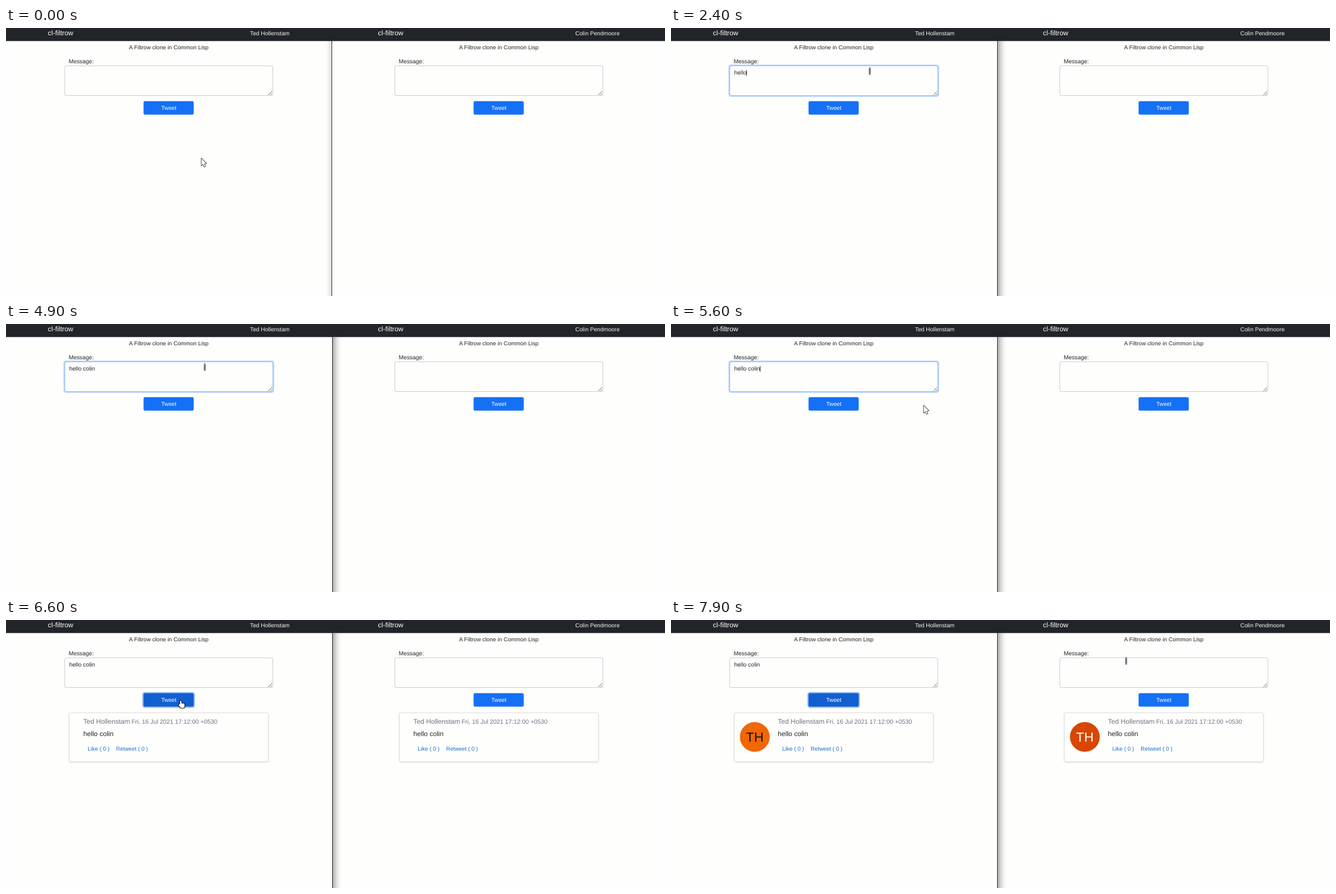
An HTML page with a canvas that plays this animation: 1172x478 px, repeating every 8000 ms.

```html
<!DOCTYPE html>
<html lang="en">
<head>
<meta charset="utf-8">
<title>cl-filtrow</title>
<style>
html, body { margin: 0; width: 1172px; height: 478px; overflow: hidden; background: #fefefd; }
canvas { display: block; }
</style>
</head>
<body>
<canvas id="stage" width="1172" height="478"></canvas>
<script>
const ctx = document.getElementById('stage').getContext('2d');
const LOOP = 8000, STEP = 100, W = 1172, H = 478, COL = 587, HEADER = 23.3;
const INK = '#212529', PAGE = '#fefefd', GREY = '#6c757d', LINK = '#1a6ed0';
const AUTHOR = 'Ted Hollenstam', READER = 'Colin Pendmoore';
const MESSAGE = 'hello colin';
const FOCUS = 900, HOVER = 6300, CLICK = 6400, POSTED = 6600, BLINK = 550;

const FIELD = { x: 104.5, y: 67.5, w: 370, h: 53 };
const BUTTON = { x: 244.6, y: 130.6, w: 89.2, h: 24 };

// first word, a pause, the space, then the second word
const SPACE = MESSAGE.indexOf(' ');
const KEYS = [...MESSAGE].map((c, i) =>
  i < SPACE ? 2000 + STEP * i
  : i === SPACE ? 3400
  : 3700 + STEP * Math.floor((i - SPACE - 1) * 1.5));

const HOME = { x: 347, y: 232 };
const MOVES = [
  { from: 400, until: 700, x: 353, y: 77, bow: 15 },
  { from: 5200, until: 5700, x: 460, y: 153, bow: 0 },
  { from: 6000, until: 6300, x: 311, y: 145, bow: 0 },
  { from: 7200, until: 7900, x: 809, y: 73, bow: 6 }
];

const ease = k => k * k * (3 - 2 * k);

function pointerAt(t) {
  let at = HOME;
  for (const m of MOVES) {
    if (t >= m.until) { at = m; continue; }
    if (t <= m.from) break;
    const k = ease((t - m.from) / (m.until - m.from));
    const dx = m.x - at.x, dy = m.y - at.y;
    const side = m.bow * Math.sin(Math.PI * k) / Math.hypot(dx, dy);
    return { x: at.x + dx * k - dy * side, y: at.y + dy * k + dx * side };
  }
  return at;
}

function text(str, x, y, size, color = INK, align = 'left') {
  ctx.font = `${size}px "Liberation Sans", Arial, sans-serif`;
  ctx.textAlign = align;
  ctx.fillStyle = color;
  ctx.fillText(str, x, y);
}

function box({ x, y, w, h }, grow, fill, stroke) {
  ctx.beginPath();
  ctx.roundRect(x - grow, y - grow, w + 2 * grow, h + 2 * grow, 2.5 + grow);
  if (fill) { ctx.fillStyle = fill; ctx.fill(); }
  if (stroke) { ctx.strokeStyle = stroke; ctx.lineWidth = 1; ctx.stroke(); }
}

function field(focus) {
  if (focus) box(FIELD, 2.5, `rgba(13,110,253,${0.25 * focus})`);
  box(FIELD, 0, PAGE, '#c9cccd');
  if (focus) box(FIELD, 0, null, `rgba(134,183,254,${focus})`);
  ctx.strokeStyle = '#666';
  ctx.beginPath();
  for (const size of [6.5, 2.5]) {
    ctx.moveTo(473 - size, 119.5);
    ctx.lineTo(473, 119.5 - size);
  }
  ctx.stroke();
}

function button(dark, ring) {
  if (ring) box(BUTTON, 2.2, 'rgba(49,132,253,.5)');
  box(BUTTON, 0, dark ? '#125fd0' : '#1470f5');
  text('Tweet', 289.5, 146, 10.2, '#fff', 'center');
}

function card(avatar, fill, ink) {
  const frame = { x: 112.5, y: 165.5, w: 354, h: 87 };
  ctx.save();
  ctx.shadowColor = 'rgba(0,0,0,.12)';
  ctx.shadowOffsetY = 1.3;
  ctx.shadowBlur = 3;
  box(frame, 0.5, PAGE);
  ctx.restore();
  box(frame, 0, null, '#dcdddd');
  ctx.save();
  if (avatar) {
    ctx.fillStyle = fill;
    ctx.beginPath();
    ctx.arc(149, 208.5, 26.5, 0, Math.PI * 2);
    ctx.fill();
    text('TH', 149, 217.3, 23.5, ink, 'center');
  } else ctx.translate(-52.5, 0);
  text(AUTHOR, 190, 185.3, 12.05, GREY);
  text('Fri, 16 Jul 2021 17:12:00 +0530', 275.7, 185.3, 10.8, GREY);
  text(MESSAGE, 190, 206.5, 12.1);
  text('Like ( 0 )', 197.8, 233, 10, LINK);
  text('Retweet ( 0 )', 248.3, 233, 9.9, LINK);
  ctx.restore();
}

function panel(dx, user, body) {
  ctx.save();
  ctx.translate(dx, 0);
  text('cl-filtrow', 74.6, 13, 12.3, '#fff');
  text(user, 504.3, 13, 10.2, '#f4f4f4', 'right');
  text('A Filtrow clone in Common Lisp', 289.5, 38, 10.1, INK, 'center');
  text('Message:', 111.4, 62.7, 10.3);
  body();
  ctx.restore();
}

// the active window casts its shadow over the other one
function divider(x, dir, reach, peak) {
  for (let i = 1; i <= reach; i++) {
    ctx.fillStyle = `rgba(0,0,0,${peak * (1 - i / (reach + 1)) ** 2})`;
    ctx.fillRect(x + dir * i, HEADER, 1, H);
  }
  ctx.fillStyle = '#26292b';
  ctx.fillRect(x, 0, 1, H);
}

function outline(width) {
  ctx.lineJoin = 'round';
  ctx.lineWidth = width;
  ctx.strokeStyle = '#000';
  ctx.fillStyle = '#fff';
  ctx.stroke();
  ctx.fill();
}

function arrow() {
  ctx.beginPath();
  ctx.moveTo(0.5, 0.5);
  ctx.lineTo(0.5, 13.5);
  ctx.lineTo(3.4, 10.8);
  ctx.lineTo(5.4, 15.6);
  ctx.lineTo(7.5, 14.7);
  ctx.lineTo(5.5, 10);
  ctx.lineTo(9.3, 9.6);
  ctx.closePath();
  outline(1.4);
}

function beam() {
  ctx.beginPath();
  for (const y of [-5, 5]) {
    ctx.moveTo(-1.5, y);
    ctx.lineTo(1.5, y);
  }
  ctx.moveTo(0, -5);
  ctx.lineTo(0, 5);
  for (const [color, width] of [['#000', 2.6], ['#fff', 0.8]]) {
    ctx.strokeStyle = color;
    ctx.lineWidth = width;
    ctx.stroke();
  }
}

function hand() {
  ctx.beginPath();
  ctx.roundRect(-1.5, -1, 2.6, 9, 1.2);
  ctx.roundRect(-3.5, 5, 3, 4, 1.2);
  ctx.roundRect(-1.5, 3.8, 8, 8, 2);
  outline(2);
}

function pointer(t) {
  const { x, y } = pointerAt(t);
  const lx = x > 580 ? x - COL : x;
  const over = b => lx >= b.x && lx <= b.x + b.w && y >= b.y && y <= b.y + b.h;
  ctx.save();
  ctx.translate(Math.round(x), Math.round(y));
  if (over(FIELD)) {
    ctx.translate(0.5, 0);
    beam();
  } else if (over(BUTTON)) hand();
  else arrow();
  ctx.restore();
}

function focusAt(t) {
  if (t <= FOCUS || t >= POSTED) return 0;
  if (t >= CLICK) return 0.25;
  return Math.min(1, (t - FOCUS) / 160);
}

function typing(t) {
  const done = KEYS.filter(k => k <= t);
  const typed = MESSAGE.slice(0, done.length);
  text(typed, 112.4, 82.6, 10.3);
  if (t < FOCUS || t >= CLICK) return;
  const since = t - Math.max(FOCUS, ...done);
  if (Math.floor(since / BLINK) % 2) return;
  ctx.fillRect(Math.round(112.6 + ctx.measureText(typed).width), 75, 1, 10);
}

function draw(t) {
  ctx.fillStyle = PAGE;
  ctx.fillRect(0, 0, W, H);
  if (t < FOCUS) divider(579, -1, 12, 0.16);
  else divider(580, 1, 17, 0.36);
  ctx.fillStyle = INK;
  ctx.fillRect(0, 0, W, HEADER);

  panel(0, AUTHOR, () => {
    field(focusAt(t));
    typing(t);
    button(t >= HOVER, t >= CLICK);
    if (t >= POSTED) card(t >= POSTED + 300, '#f06703', '#111');
  });
  panel(COL, READER, () => {
    field(0);
    button(false, false);
    if (t >= POSTED) card(t >= POSTED + 400, '#d84602', '#fff');
  });
  pointer(t);
}

ctx.textRendering = 'geometricPrecision';
const start = performance.now();
function tick() {
  const t = (performance.now() - start) % LOOP;
  draw(Math.floor(t / STEP) * STEP);
  requestAnimationFrame(tick);
}
tick();
</script>
</body>
</html>
```
